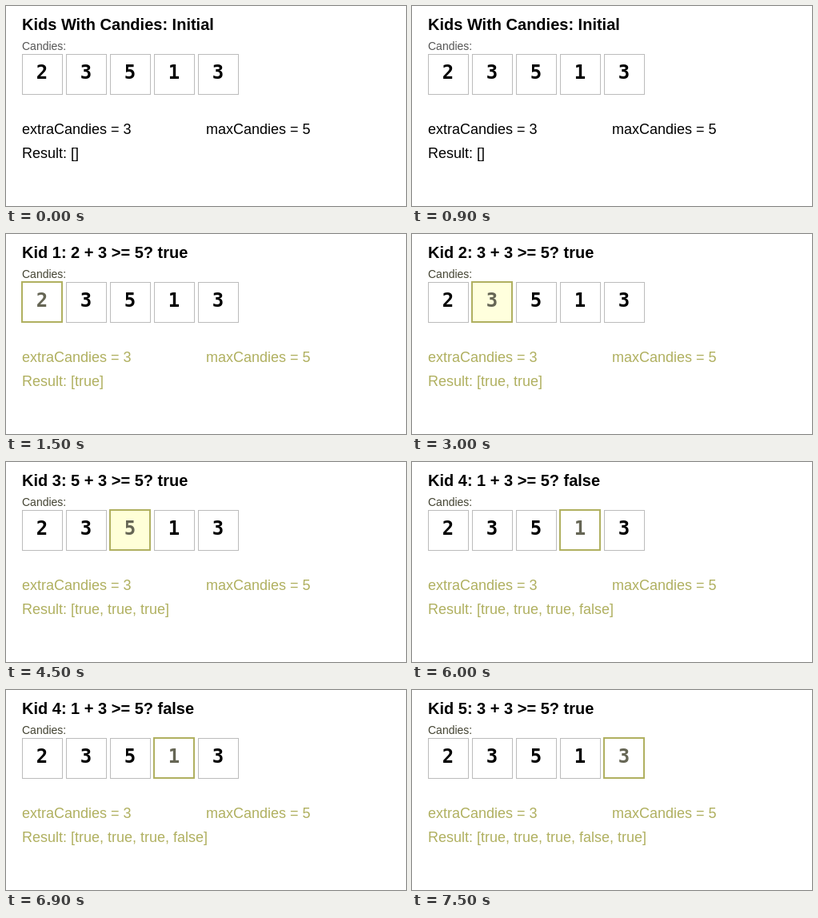
These frames come from a looping animation (500 by 250 pixels, 8000 ms). An HTML page:

```html
<!DOCTYPE html>
<html lang="en">
<head>
<meta charset="utf-8">
<title>Kids With Candies</title>
<style>
  html, body { margin: 0; width: 100%; height: 100%; overflow: hidden; background: #fff; }
  #stage { position: relative; width: 500px; height: 250px; overflow: hidden; background: #fff;
    font-family: "Liberation Sans", Arial, sans-serif; color: #000; }
  #stage > div { position: absolute; white-space: pre; box-sizing: border-box; }
  #title { left: 20px; top: 12px; font-size: 20px; line-height: 22px; font-weight: bold; }
  #label { left: 20px; top: 42px; font-size: 14px; line-height: 16px; color: #555; }
  .line { left: 20px; font-size: 18px; line-height: 20px; }
  .box { top: 60px; width: 51px; height: 51px; border: 1px solid #bbb; }
  .box.on { top: 59px; width: 52px; height: 52px; margin-left: -1px; border: 2px solid #b0b060; }
  .digit { top: 69px; width: 50px; text-align: center; font-size: 24px; line-height: 28px;
    font-weight: bold; font-family: "DejaVu Sans Mono", monospace; }
  .digit.on { color: #666655; }
  .run #label { color: #444433; }
  .run .line { color: #b0b060; }
</style>
</head>
<body>
<div id="stage">
  <div id="title"></div>
  <div id="label">Candies:</div>
  <div class="line" style="top:144px">extraCandies = 3</div>
  <div class="line" style="top:144px;left:250px">maxCandies = 5</div>
  <div class="line" style="top:174px" id="result"></div>
</div>
<script>
  const LOOP = 8000, STEP = 1500;
  const candies = [2, 3, 5, 1, 3], extra = 3, most = Math.max(...candies);
  const fills = ['#fff', '#ffffdd', '#ffffd8', '#fff', '#fff'];
  const stage = document.getElementById('stage');
  const title = document.getElementById('title');
  const result = document.getElementById('result');

  function add(className, x, text = '') {
    const el = document.createElement('div');
    el.className = className;
    el.style.left = x + 'px';
    el.textContent = text;
    return stage.appendChild(el);
  }

  const cells = candies.map((n, i) => {
    const x = 20 + 55 * i;
    return { box: add('box', x), digit: add('digit', x, n) };
  });
  const answers = candies.map(n => n + extra >= most);

  function show(step) {
    const kid = step - 1;
    stage.classList.toggle('run', step > 0);
    title.textContent = step
      ? `Kid ${step}: ${candies[kid]} + ${extra} >= ${most}? ${answers[kid]}`
      : 'Kids With Candies: Initial';
    result.textContent = `Result: [${answers.slice(0, step).join(', ')}]`;
    cells.forEach(({ box, digit }, i) => {
      const on = i === kid;
      box.classList.toggle('on', on);
      digit.classList.toggle('on', on);
      box.style.background = on ? fills[i] : '#fff';
    });
  }

  let current = -1;
  const start = performance.now();
  function tick() {
    const step = Math.floor(((performance.now() - start) % LOOP) / STEP);
    if (step !== current) show(current = step);
    requestAnimationFrame(tick);
  }
  tick();
</script>
</body>
</html>
```
